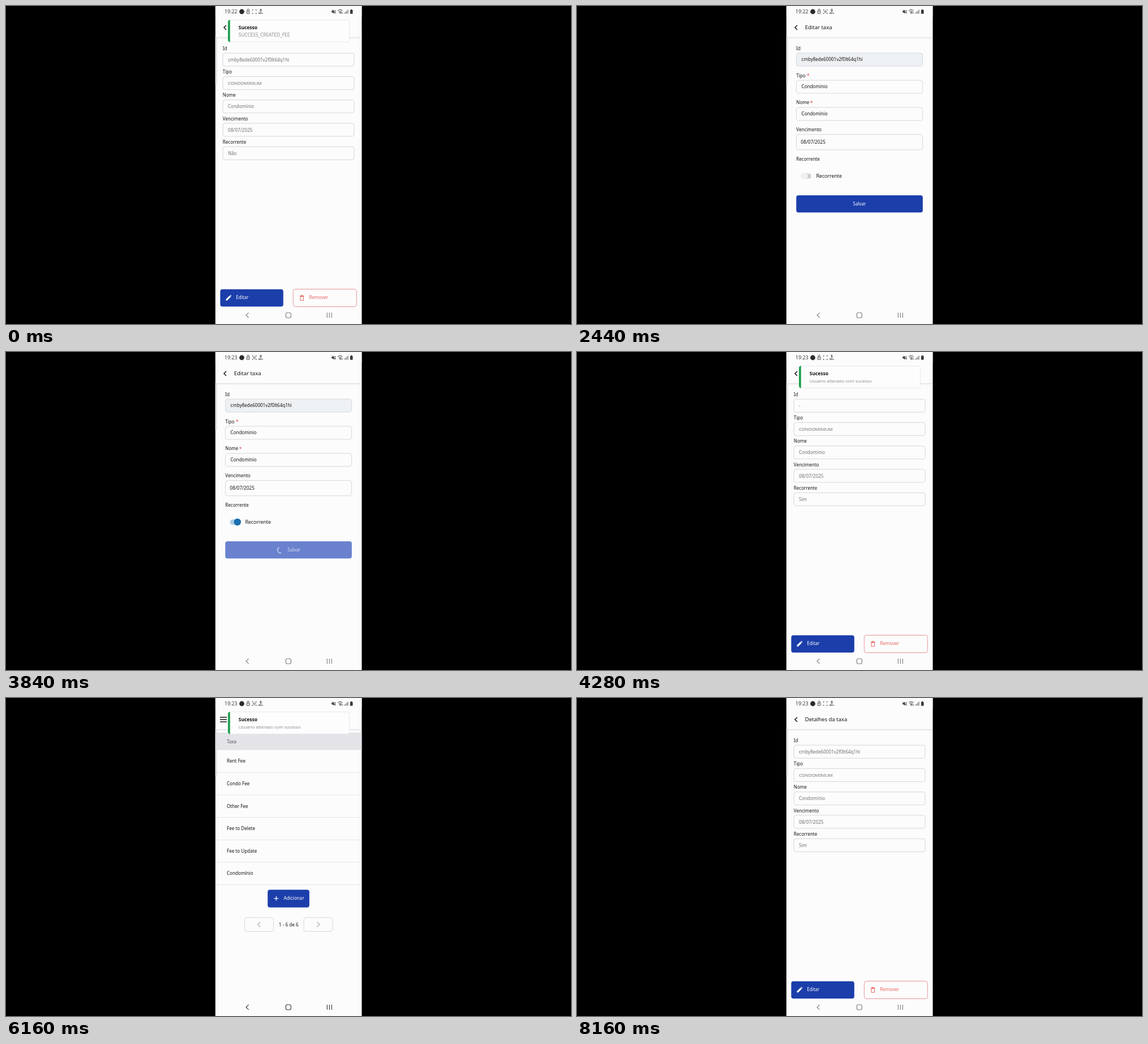
Animation of 998x561 px, one loop 8.24 s. Source, as an HTML page with a canvas:

```html
<!DOCTYPE html>
<html lang="pt">
<head>
<meta charset="utf-8">
<title>Taxas</title>
<style>
html, body { margin: 0; width: 100%; height: 100%; overflow: hidden; background: #000; }
canvas { display: block; }
</style>
</head>
<body>
<canvas id="stage" width="998" height="561"></canvas>
<script>
const LOOP = 8240;
const ctx = document.getElementById('stage').getContext('2d');
const BG = '#fcfcfd', BLUE = '#1b3eaa', RED = '#e3655f', INK = '#151517', GREY = '#717175', BORDER = '#d3d3da';
const LEFT = 369.7, RIGHT = 628.5, WIDTH = RIGHT - LEFT, NAV_TOP = 531;
const ID = 'cmby8ede60001v2f0lt64q1hi';

const between = (t, a, b) => t >= a && t < b;
const ramp = (t, a, b) => Math.min(1, Math.max(0, (t - a) / (b - a)));
const easeOut = p => 1 - (1 - p) ** 3;
const mix = (a, b, p) => a + (b - a) * p;

// y is the middle of the capital letters
function text(s, x, y, size = 8, color = INK, weight = 400, align = 'left') {
  ctx.font = `${weight} ${size}px "Noto Sans", "Open Sans", sans-serif`;
  ctx.fillStyle = color;
  ctx.textAlign = align;
  ctx.fillText(s, x, y + size * 0.36);
}

function rect(x, y, w, h, fill) {
  ctx.fillStyle = fill;
  ctx.fillRect(x, y, w, h);
}

function box(x, y, w, h, r, fill, stroke) {
  ctx.beginPath();
  ctx.roundRect(x, y, w, h, r);
  if (fill) { ctx.fillStyle = fill; ctx.fill(); }
  if (stroke) { ctx.strokeStyle = stroke; ctx.lineWidth = 0.9; ctx.stroke(); }
}

function path(d, x, y, color, width) {
  const p = new Path2D(d);
  ctx.save();
  ctx.translate(x, y);
  if (width) {
    ctx.strokeStyle = color;
    ctx.lineWidth = width;
    ctx.stroke(p);
  } else {
    ctx.fillStyle = color;
    ctx.fill(p);
  }
  ctx.restore();
}

function dot(x, y, r, color) {
  ctx.fillStyle = color;
  ctx.beginPath();
  ctx.arc(x, y, r, 0, 7);
  ctx.fill();
}

function header(title, menu) {
  rect(LEFT, 0, WIDTH, NAV_TOP, BG);
  rect(LEFT, 55.3, WIDTH, 1, '#d9d9dd');
  rect(LEFT, 56.3, WIDTH, 1.2, '#f0f0f2');
  if (menu) path('M-6-4H6M-6 0H6M-6 4H6', 384, 38, INK, 1.4);
  else path('M2-4-2 0 2 4', 387, 38, INK, 1.5);
  text(title, 402.7, 38, 9.5, INK, 500);
}

function details(values) {
  header('Detalhes da taxa');
  ['Id', 'Tipo', 'Nome', 'Vencimento', 'Recorrente'].forEach((label, i) => {
    const y = 75 + i * 41.25;
    text(label, 382.8, y, 8, INK, 500);
    box(383, y + 8.2, 232, 23, 4, null, BORDER);
    text(values[i], 392, y + 20, i == 1 ? 7.8 : i == 3 ? 8.2 : 8, GREY);
  });
  box(378.4, 499.8, 111.4, 30.5, 4, BLUE);
  path('M-4.5 4.5V2.3L1.8-4 4-1.8-2.3 4.5ZM2.4-4.6 3.4-5.4 5.4-3.4 4.6-2.4Z', 393, 515, '#fff');
  text('Editar', 406.3, 514.3, 8, '#fff', 500);
  box(507.3, 499.5, 112, 31, 4, null, '#e58a88');
  path('M-2.8-2.5V4.3H2.8V-2.5ZM-3.8-3.6H3.8M-1.4-4.6H1.4', 522.7, 515, RED, 1);
  text('Remover', 535.5, 514.3, 8, RED);
}

function edit(t) {
  header('Editar taxa');
  const fields = [
    ['Id', 74.8, 83, 23, ID], ['Tipo', 122.8, 131, 23, 'Condominio'],
    ['Nome', 170.6, 178.9, 23, 'Condomínio'], ['Vencimento', 218.4, 226.7, 27, '08/07/2025']
  ];
  fields.forEach(([label, y, top, h, value], i) => {
    text(label, 387.3, y, 8, INK, 500);
    if (i == 1 || i == 2) text('*', i == 1 ? 406 : 411.8, y + 0.5, 8.5, '#e03c3c');
    box(387.5, top, 223, h, 4, i ? null : '#eef1f3', BORDER);
    text(value, i == 3 ? 395.3 : 396.6, top + h / 2, i == 3 ? 8.2 : 8);
  });
  text('Recorrente', 387.3, 270.4, 8, INK, 500);

  const on = easeOut(ramp(t, 2760, 2960));
  box(395.8, 295.5, 18, 9, 4.5, '#cfcfd4');
  ctx.save();
  ctx.globalAlpha *= on;
  box(395.8, 295.5, 18, 9, 4.5, '#a9cbe5');
  ctx.restore();
  dot(mix(401.5, 408.8, on), 300, 6.2, `rgb(${mix(240, 26, on)},${mix(240, 111, on)},${mix(242, 177, on)})`);
  text('Recorrente', 422.4, 300.2, 8.8);

  const saving = t >= 3400;
  box(387.3, 334, 223.5, 30.3, 4, saving ? '#6a81ce' : BLUE);
  if (saving) {
    const a = (t - 3640) / 1000 * Math.PI * 2;
    ctx.strokeStyle = '#e8ecf8';
    ctx.lineWidth = 1.1;
    ctx.beginPath();
    ctx.arc(484.7, 349.6, 5, a, a + 3);
    ctx.stroke();
    text('Salvar', 497.3, 349.2, 8, '#d3daf0');
  } else {
    text('Salvar', 499, 349.2, 8, '#fff', 400, 'center');
  }
}

function list() {
  header('Taxas', true);
  rect(LEFT, 61, WIDTH, 30.8, '#e3e3e8');
  text('Taxa', 390, 77, 8, '#55555b');
  ['Rent Fee', 'Condo Fee', 'Other Fee', 'Fee to Delete', 'Fee to Update', 'Condomínio'].forEach((name, i) => {
    const y = 111.4 + i * 39.6;
    text(name, 390, y, 8.1);
    rect(LEFT, y + 19.6, WIDTH, 0.8, '#e0e0e4');
  });
  box(462.2, 338.2, 73.6, 31.2, 4, BLUE);
  path('M-4 0H4M0-4V4', 477.4, 353.6, '#fff', 1.2);
  text('Adicionar', 490.5, 353.2, 8.1, '#fff', 500);
  box(421.6, 387.3, 51, 24.5, 4, null, BORDER);
  box(526, 387.3, 51, 24.5, 4, null, BORDER);
  path('M2-4.5-2.5 0 2 4.5', 447, 399.6, '#c2c2c7', 1.6);
  path('M-2-4.5 2.5 0-2 4.5', 551.3, 399.6, '#c2c2c7', 1.6);
  text('1 - 6 de 6', 499.3, 399.6, 8.2, INK, 400, 'center');
}

// Draws a whole screen zoomed about the middle of the phone
function screen(draw, scale = 1, alpha = 1) {
  if (alpha <= 0) return;
  ctx.save();
  ctx.globalAlpha = alpha;
  ctx.translate(499, 275.5);
  ctx.scale(scale, scale);
  ctx.translate(-499, -275.5);
  draw();
  ctx.restore();
}

function open(from, to, t, start) {
  screen(from, 1 + 0.1 * easeOut(ramp(t, start, start + 150)));
  screen(to, mix(0.9, 1, easeOut(ramp(t, start + 90, start + 360))), ramp(t, start + 100, start + 200));
}

function close(from, to, t, start) {
  screen(to, mix(1.1, 1, easeOut(ramp(t, start, start + 200))));
  screen(from, mix(1, 0.9, easeOut(ramp(t, start, start + 200))), 1 - ramp(t, start, start + 90));
}

function content(t) {
  const values = ['CONDOMINIUM', 'Condomínio', '08/07/2025'];
  const created = () => details([ID, ...values, 'Não']);
  const updated = () => details([t < 4440 ? '-' : ID, ...values, 'Sim']);
  const reopened = () => details(t < 7800 ? Array(5).fill('-') : [ID, ...values, 'Sim']);
  const form = () => edit(t);
  const blank = () => rect(LEFT, 0, WIDTH, NAV_TOP, BG);

  if (t < 1790) screen(created);
  else if (t < 2200) open(created, form, t, 1790);
  else if (t < 4000) screen(form);
  else if (t < 4240) close(form, updated, t, 4000);
  else if (t < 5480) screen(updated);
  else if (t < 5800) close(updated, blank, t, 5480);
  else if (t < 7280) screen(list, 1, ramp(t, 5800, 5900));
  else if (t < 7640) open(list, reopened, t, 7280);
  else screen(reopened);
}

function toast(message, size, dy) {
  if (dy <= -70) return;
  ctx.save();
  ctx.translate(0, dy);
  box(392.4, 24.6, 214, 38.8, 4, '#fdfdfe', '#e6e6eb');
  ctx.beginPath();
  ctx.roundRect(392, 24.5, 214, 39, 4);
  ctx.clip();
  rect(392, 24, 3.8, 40, '#1fa04f');
  text('Sucesso', 410.7, 38.4, 8.5, INK, 600);
  text(message, 410.7, 51.2, size, '#8b8b90');
  ctx.restore();
}

function status(t) {
  const c = '#3a3a3d';
  text(t < 2760 ? '19:22' : '19:23', 386, 10.3, 8.8, c);
  dot(416.5, 10, 4.4, '#2b2b2e');
  box(425.2, 9, 5, 4.4, 0.8, null, c);
  path('M-1.5 0V-2A1.5 1.5 0 0 1 1.5-2V0M0 2V3', 427.7, 8.8, c, 0.9);
  path('M-3.4-2V-3.4H-2M2-3.4H3.4V-2M3.4 2V3.4H2M-2 3.4H-3.4V2', 438.7, 10, c, 0.9);
  if (between(t, 1200, 4240) || between(t, 5360, 7000)) {
    ctx.beginPath();
    ctx.arc(438.7, 10, 1.6, 0, 7);
    ctx.strokeStyle = c;
    ctx.stroke();
  }
  const speed = between(t, 1800, 2200) ? 1 : between(t, 4240, 4800) ? 5 : between(t, 5360, 6160) ? 12 : 0;
  text(speed, 450, 8, 6.2, c, 600, 'center');
  text('KB/s', 450, 12.9, 3.6, c, 600, 'center');

  path('M-3.5-1.3H-1.8L1-3.5V3.5L-1.8 1.3H-3.5Z', 578.5, 10, c);
  path('M-3.5-3.5 3.5 3.5M2.5-3V3', 579, 10, c, 0.9);
  path('M-4.3-1.3Q0-5 4.3-1.3M-2.7.6Q0-1.8 2.7.6', 590.3, 9.6, c, 1);
  dot(590.3, 12, 1.2, c);
  path('M2 1.5V4M4 1.5V4', 590.3, 9.5, c, 0.8);
  path('M-3 3.5V1.5M-1 3.5V0M1 3.5V-1.8M3 3.5V-3.5', 601, 10, '#7a7a7e', 1.2);
  box(607.8, 7, 4.7, 6.8, 0.8, c);
  rect(609, 6, 2.3, 1, c);
}

function navBar(t) {
  rect(LEFT, NAV_TOP, WIDTH, 30, BG);
  const press = Math.min(ramp(t, 5400, 5480), 1 - ramp(t, 5700, 5900));
  if (press > 0) {
    ctx.globalAlpha = press;
    box(387.8, 531, 77, 30, 15, '#ebebf1');
    ctx.globalAlpha = 1;
  }
  const c = between(t, 5400, 7600) ? '#3c3c3f' : '#818185';
  path('M2.3-4.4-2.2 0 2.3 4.4', 426.3, 545.5, c, 1.2);
  ctx.beginPath();
  ctx.roundRect(494.3, 541, 9, 9, 2.8);
  ctx.lineWidth = 1.2;
  ctx.strokeStyle = c;
  ctx.stroke();
  path('M-4-4.4V4.4M0-4.4V4.4M4-4.4V4.4', 571.3, 545.5, c, 1.2);
}

function draw(t) {
  rect(0, 0, 998, 561, '#000');
  ctx.save();
  ctx.beginPath();
  ctx.rect(LEFT, 0, WIDTH, 561);
  ctx.clip();
  rect(LEFT, 0, WIDTH, 561, BG);
  content(t);
  rect(LEFT, 0, WIDTH, 19.3, BG);
  if (t < 1900) toast('SUCCESS_CREATED_FEE', 8.3, -70 * ramp(t, 1800, 1900));
  else if (between(t, 4060, 8000)) {
    toast('Usuário alterado com sucesso', 7.8, -70 * (1 - easeOut(ramp(t, 4060, 4220)) + ramp(t, 7860, 8000)));
  }
  status(t);
  navBar(t);
  box(367, 54.5, 5, 84, 2, '#ededf0', '#c9c9ce');
  ctx.restore();
}

function frame() {
  draw(performance.now() % LOOP);
  requestAnimationFrame(frame);
}
frame();
</script>
</body>
</html>
```
